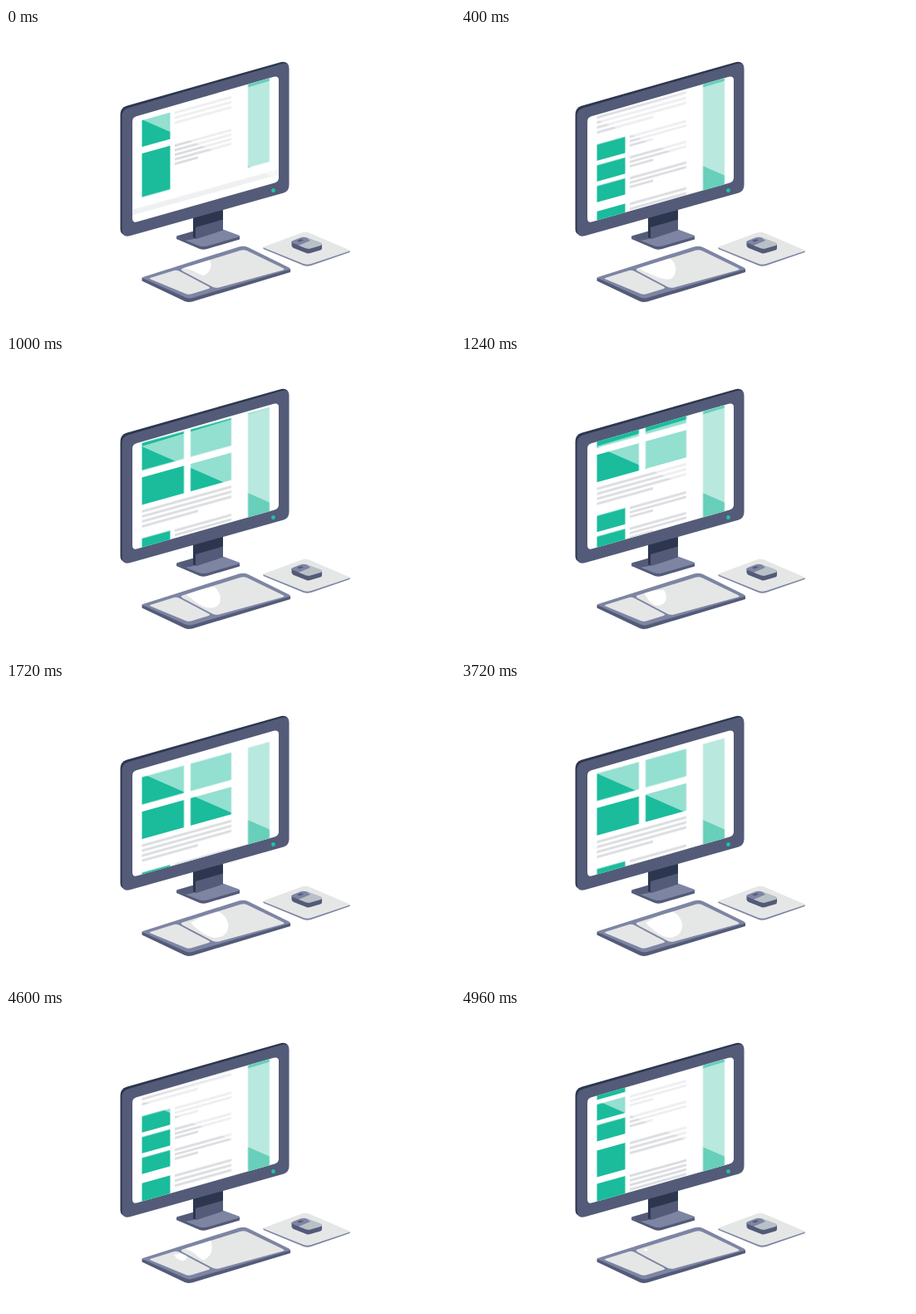
Write an HTML page without scripts that moves like this. It is 540x360 px and loops after 5 s.

```html
<!DOCTYPE html>
<html lang="en">
<head>
<meta charset="utf-8">
<title>Scrolling page on a desktop computer</title>
<style>
html, body { margin: 0; width: 100%; height: 100%; overflow: hidden; background: #fff; }
svg { display: block; width: 540px; height: 360px; }
.frame { fill: #535b78; }
.edge { fill: #2c374f; }
.top { fill: #7d85a3; }
.pad { fill: #e5e6e6; }
.card { fill: #1abc9c; }
.side { fill: #68cfba; }
.band { fill: #eff0f1; }
.text { stroke: #dadce0; stroke-width: 2.8; }
.page { animation: scroll 5s -4ms infinite; }
@keyframes scroll {
  0% { transform: translateY(-199px); animation-timing-function: steps(19); }
  15.2% { transform: translateY(9.5px); animation-timing-function: steps(1); }
  16% { transform: translateY(14px); animation-timing-function: steps(13); }
  26.4% { transform: translateY(-45px); animation-timing-function: steps(10); }
  34.4% { transform: translateY(0); }
  73.6% { transform: translateY(0); animation-timing-function: steps(33); }
  100% { transform: translateY(-144px); }
}
.glint { opacity: 0; animation: glint 5s -4ms step-end infinite; }
@keyframes glint {
  0% { opacity: 0; }
  88% { opacity: 1; }
  95% { opacity: 0; }
}
</style>
</head>
<body>
<svg viewBox="0 0 540 360">
  <defs>
    <clipPath id="screen">
      <path d="M152 113Q152 107.500 157 106.200L322 58.800Q328 57.200 328 63V180Q328 185 323 186.500L158 233.300Q152 235 152 229Z"/>
    </clipPath>
    <clipPath id="keys">
      <path id="keysShape" d="M212 289.500L282 267.800Q286 266.500 290 268.300L333 289Q336 290.500 333 291.500L256 312.500Q252 313.500 248 311.500L212 292.500Q209.500 290.500 212 289.500Z"/>
    </clipPath>
    <g id="item">
      <path class="card" d="M-.5 229.500H33.500V249H-.5Z"/>
      <path class="text" d="M39 231H107M39 236.300H107M39 241.600H67"/>
    </g>
  </defs>

  <!-- stand -->
  <path class="frame" d="M205 251V254L233 266Q237 267.500 242 266L281 254.500V250.500L240 260Z"/>
  <path class="top" d="M206 250L226 244.500L261 242.500L280 249.500Q282 250.500 280 251.500L242 262.500Q237 263.700 233 262.500L206 252Q204 251 206 250Z"/>
  <path class="frame" d="M205 251L226 244.500V254L215 256Z"/>
  <path class="frame" d="M225 226L261 216V243.500L229 254L225 252.500Z"/>
  <path class="edge" d="M225 226L261 216V230.500L228 240V253.500L225 252.500Z"/>

  <!-- monitor -->
  <path class="edge" d="M137.500 104.500Q137.500 96 145 93.700L331 41Q339.500 39.500 340 48V190L146 249Q137.500 250 137.500 242Z"/>
  <path class="frame" d="M139.500 106Q139.500 98.500 147 96.200L332 43Q340.500 41 340.500 49V189Q340.500 196.500 334 198.500L149 250.300Q139.500 252.500 139.500 243Z"/>
  <ellipse cx="321.500" cy="195.500" rx="2.300" ry="2.600" fill="#1fc4a4"/>

  <g clip-path="url(#screen)">
    <path d="M150 50H330V240H150Z" fill="#fff"/>
    <g transform="matrix(1 -.278 0 1 164 0)">
      <g class="page">
        <path class="band" d="M-14 95H166V102H-14ZM-14 414.500H166V421H-14Z"/>
        <path class="side" d="M127 114.500H153V402.500H127Z"/>
        <path class="card" d="M-.5 114.500H50V147.500H-.5ZM58 114.500H107V147.500H58ZM-.5 156H50V189H-.5ZM58 156H107V189H58Z"/>
        <path class="text" d="M-.5 197H107M-.5 203H107M-.5 209H107M-.5 215H67"/>
        <use href="#item"/>
        <use href="#item" y="25"/>
        <use href="#item" y="50"/>
        <path class="card" d="M-.5 310H33.500V342H-.5ZM-.5 350H33.500V402.500H-.5Z"/>
        <path class="text" d="M39 312H107M39 318H107M39 324H107"/>
        <path class="text" d="M39 351.500H107M39 357H107M39 362.500H107M39 368H107M39 373.500H67"/>
      </g>
    </g>
    <path d="M163 109.900L330 59.700V183.300Z" fill="#fff" opacity=".53"/>
  </g>

  <!-- keyboard -->
  <path class="frame" d="M163.500 300.500V304.500L215 329Q219 330.500 224 329.500L342 294V290L220 322Z"/>
  <path class="top" d="M166 299.500L280 263.500Q286 261.800 291 264L340.500 288.500Q343 290 340 291L224 325Q219 326.300 215 324L165 301.500Q162.500 300.500 166 299.500Z"/>
  <path class="pad" d="M174 300.700L202 292Q205.500 291.200 208.500 292.800L243.500 311.300Q246.500 313 243.500 314L223 320.300Q219 321.500 215 319.500L174 302.500Q171.500 301.500 174 300.700Z"/>
  <use href="#keysShape" class="pad"/>
  <path class="glint" d="M202 296L210 294L217 297Q219 302 213 303Q206 303 202 296Z" fill="#fff"/>
  <g clip-path="url(#keys)">
    <path fill="#fff">
      <animate attributeName="d" dur="5s" repeatCount="indefinite"
        keyTimes="0;.152;.248;.344;.744;.92;.992;1"
        values="M213 289C222 285 230 279 244 278C249 285 247 293 238 298C232 297 226 291 213 289Z;
                M214 290C226 285 244 277 256 275C269 280 275 300 264 306C252 310 240 306 214 290Z;
                M220 287C226 284 234 283 244 283C249 291 247 299 240 301C234 303 229 301 220 287Z;
                M222 290C232 284 244 278 256 277C268 282 272 300 260 306C250 310 240 308 222 290Z;
                M222 290C232 284 244 278 255 277C267 282 271 300 258 306C250 310 240 308 222 290Z;
                M214 288C224 285 232 278 246 278C249 286 249 296 239 302C233 303 228 292 214 288Z;
                M220 290C221 289 223 288 224 289C225 290 224 291 223 291C222 292 221 291 220 290Z;
                M220 290C221 289 223 288 224 289C225 290 224 291 223 291C222 292 221 291 220 290Z"/>
    </path>
  </g>

  <!-- mouse and pad -->
  <path class="top" d="M309.500 264V266L358 286Q362 287.300 367 286L413.500 270V268Z"/>
  <path class="pad" d="M311 263L355 246.700Q360 245 365 246.700L412 267Q414.500 268.200 412 269L367 284Q362 285.500 358 284L311 265Q308.500 264 311 263Z"/>
  <path class="frame" d="M343.500 257V262Q344 264 346 265L360 270.500Q363 272 366 271L378 267.500Q380 267 380 265V260Z"/>
  <path class="top" d="M345 256L354 252.500Q358 251 362 252.500L378 258.500Q382 260.500 378 262L366 265.500Q363 266.300 360 265L345 259Q342 257.500 345 256Z"/>
  <path d="M352 261.800L366 256L362 252.500L378 258.500Q382 260.500 378 262L366 265.500Q363 266.300 360 265Z" fill="#b9c1c7"/>
  <path d="M350 256L355 254.200L358 255.500L353 257.500Z" fill="#535b78"/>
</svg>
</body>
</html>
```
